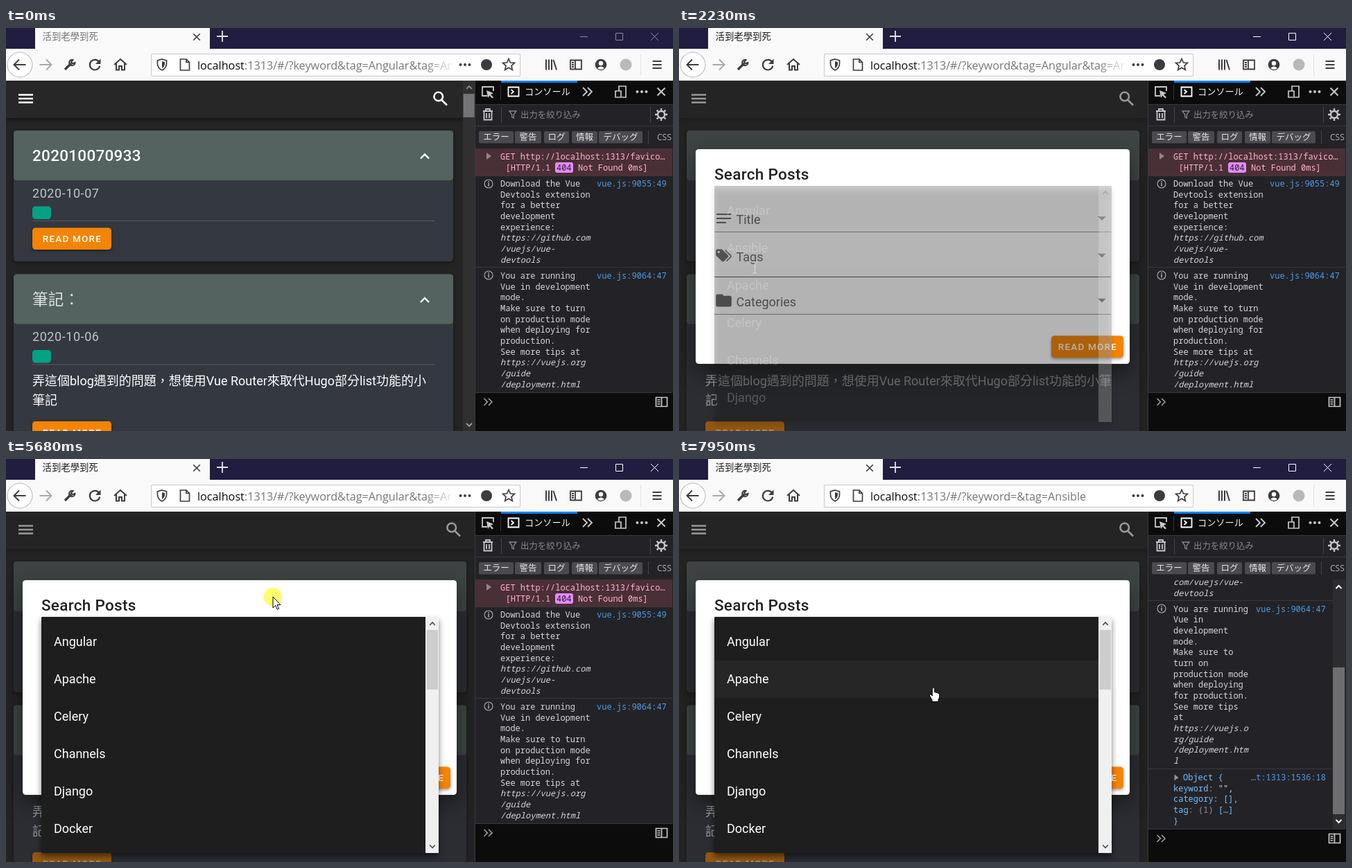
An HTML page with a canvas that plays this animation: 962x582 px, repeating every 8 s.

```html
<!DOCTYPE html>
<html lang="zh-Hant">
<head>
<meta charset="utf-8">
<title>Post search</title>
<style>
html, body { margin: 0; width: 100%; height: 100%; overflow: hidden; background: #242424; }
canvas { display: block; }
</style>
</head>
<body>
<canvas id="stage" width="962" height="582"></canvas>
<script>
const c = document.getElementById('stage').getContext('2d');
const LOOP = 8000;
const CJK = '"Noto Sans CJK TC", "Noto Sans CJK JP", sans-serif';
const roboto = (size, weight = 400) => `${weight} ${size}px Roboto, ${CJK}`;
const japanese = (size, weight = 400) => `${weight} ${size}px "Noto Sans CJK JP", sans-serif`;
const MONO = '12px "Noto Sans Mono", monospace';
const ORANGE = '#f48403', TEAL = '#00a383', GREY = '#666';

// Bursts of screen updates: start, end, number of steps.
const BURSTS = [
  [230, 300, 2], [550, 1350, 11], [1440, 1900, 7], [2050, 2450, 6], [2610, 2840, 4],
  [2990, 3070, 2], [3550, 4340, 11], [4400, 5180, 11], [5430, 5680, 4], [5820, 6210, 6],
  [6360, 7160, 11], [7240, 7320, 2], [7570, 7720, 3], [7870, 7950, 2]
];

// Pointer path: time, x, y, shape from this time on.
const POINTER = [
  [230, 819, 501, 'arrow'], [300, 509, 236, 'arrow'], [550, 509, 236, 'arrow'],
  [860, 626, 102, 'hand'], [1300, 626, 102, 'arrow'], [1515, 109, 346, 'beam'],
  [2600, 109, 346, 'beam'], [2610, 111, 336, 'hand'], [2840, 115, 336, 'hand'],
  [3070, 116, 335, 'hand'], [3550, 116, 335, 'hand'], [3790, 79, 364, 'hand'],
  [4100, 115, 263, 'hand'], [4340, 117, 300, 'hand'], [4400, 117, 303, 'hand'],
  [4750, 117, 303, 'hand'], [5180, 394, 242, 'hand'], [5430, 394, 240, 'hand'],
  [5500, 390, 222, 'arrow'], [5590, 385, 199, 'arrow'], [5900, 385, 199, 'arrow'],
  [6210, 396, 212, 'arrow'], [6360, 400, 218, 'arrow'], [6670, 610, 465, 'hand'],
  [7160, 610, 465, 'hand'], [7240, 480, 392, 'arrow'], [7320, 365, 330, 'beam'],
  [7860, 365, 330, 'beam'], [7870, 367, 330, 'hand']
];
const CLICKS = [[940, 1090], [2050, 2120], [4550, 4700], [5590, 5820], [6750, 6830], [7570, 7715]];

const SHAPES = {
  arrow: 'M0 0V16L3.7 12.5L6.2 18.2L8.6 17.2L6 11.6H11Z',
  hand: 'M-1.7 1.5Q0-.8 1.7 1.5V7Q3 6 4 7.6Q5.6 6.8 6.4 8.4Q8.5 7.7 8.7 10V14L7 18V20.5H-2V18L-5.5 12Q-6 9.5-4 10L-1.7 12Z',
  beam: 'M-3-8H3M0-8V8M-3 8H3'
};
const TAGS_ICON = 'M5.5,9A1.5,1.5 0 0,0 7,7.5A1.5,1.5 0 0,0 5.5,6A1.5,1.5 0 0,0 4,7.5A1.5,1.5 0 0,0 5.5,9M17.41,11.58C18.2,12.4 18.2,13.6 17.41,14.41L12.41,19.41C11.6,20.2 10.4,20.2 9.58,19.41L2.59,12.42C2.22,12.05 2,11.55 2,11V6C2,4.89 2.89,4 4,4H9C9.55,4 10.05,4.22 10.41,4.58L17.41,11.58M13.54,5.71L14.54,4.71L21.41,11.58C22.2,12.4 22.2,13.6 21.42,14.41L16.04,19.79L15.04,18.79L20.75,13Z';
const FOLDER_ICON = 'M10,4H4C2.89,4 2,4.89 2,6V18A2,2 0 0,0 4,20H20A2,2 0 0,0 22,18V8C22,6.89 21.1,6 20,6H12Z';

const clamp = v => Math.max(0, Math.min(1, v));
const ramp = (t, from, to) => clamp((t - from) / (to - from));
const within = (t, from, to) => t >= from && t < to;

function rect(x, y, w, h, color, r = 0) {
  c.fillStyle = color;
  c.beginPath();
  c.roundRect(x, y, w, h, r);
  c.fill();
}
function disc(x, y, r, color) {
  c.fillStyle = color;
  c.beginPath();
  c.arc(x, y, r, 0, 7);
  c.fill();
}
function text(s, x, y, font, color, spacing = 0) {
  c.font = font;
  c.fillStyle = color;
  c.letterSpacing = spacing + 'px';
  c.fillText(s, x, y);
  return x + c.measureText(s).width;
}
function stroke(d, x, y, color, width = 1.6) {
  c.save();
  c.translate(x, y);
  c.strokeStyle = color;
  c.lineWidth = width;
  c.stroke(new Path2D(d));
  c.restore();
}
function shape(d, x, y, color, scale = 1) {
  c.save();
  c.translate(x, y);
  c.scale(scale, scale);
  c.fillStyle = color;
  c.fill(new Path2D(d), 'evenodd');
  c.restore();
}
function shadowed(blur, dy, alpha, draw) {
  c.save();
  c.shadowBlur = blur;
  c.shadowOffsetY = dy;
  c.shadowColor = `rgba(0,0,0,${alpha})`;
  draw();
  c.restore();
}
function clipped(x, y, w, h, draw) {
  c.save();
  c.beginPath();
  c.rect(x, y, w, h);
  c.clip();
  draw();
  c.restore();
}
const cross = (x, y, r, color, w) => stroke(`M${-r} ${-r}L${r} ${r}M${r} ${-r}L${-r} ${r}`, x, y, color, w);
const dots = (x, y, color) => [-6.5, 0, 6.5].forEach(d => disc(x + d, y, 2, color));

function snap(t) {
  let s = 0;
  for (const [from, to, n] of BURSTS) {
    if (t < from) break;
    const step = (to - from) / (n - 1);
    s = t >= to ? to : from + Math.floor((t - from) / step + 1e-6) * step;
  }
  return s;
}

function drawUrl(t) {
  const font = '16.2px "Open Sans", sans-serif', y = 59.5;
  clipped(270, 38, 373, 31, () => {
    const x = text('localhost', 276, y, font, '#0c0c0d');
    if (t >= 6900) {
      text(':1313/#/?keyword=&tag=Ansible', x, y, font, '#76767a');
    } else {
      const fade = c.createLinearGradient(605, 0, 643, 0);
      fade.addColorStop(0, '#76767a');
      fade.addColorStop(1, 'rgba(118,118,122,0.1)');
      text(':1313/#/?keyword&tag=Angular&tag=An', x, y, font, fade);
    }
  });
}

function drawBrowser(t) {
  const ink = '#3c3c40', y = 53, active = t >= 1020;
  rect(0, 0, 962, 31, '#201d40');
  rect(42, 0, 252, 31, '#f9f9fa');
  rect(0, 30, 962, 46, '#f9f9fa');
  text('活到老學到死', 52.5, 17, `13.4px ${CJK}`, active ? '#1c1c1e' : '#737376');
  cross(275, 13, 4.8, ink, 1.6);
  stroke('M-8 0H8M0-8V8', 312, 12, '#e4e4ea', 1.8);
  stroke('M828 12.5H839M879.5 7.5H889.5V17.5H879.5ZM930 7L941 18M941 7L930 18', 0, 0, active ? '#fff' : '#8f8da0', 1);

  disc(20, y, 18.5, '#b5b5b8');
  disc(20, y, 17.5, '#fff');
  stroke('M8.5 0H-8M-1-7.5L-8.5 0L-1 7.5', 20, y, ink, 2);
  stroke('M-8.5 0H8M1-7.5L8.5 0L1 7.5', 57, y, '#a9a9ac', 2);
  stroke('M-7 7L2-2', 92, y, ink, 3.4);
  stroke('M4.5-7A4.2 4.2 0 1 0 7.5-3L3.5-1.5L2-4Z', 92, y, ink, 2);
  stroke('M6.2-4A7.3 7.3 0 1 0 7.3 1.8', 128, y, ink, 2.2);
  shape('M8.5-8.5V-1H1Z', 128, y, ink);
  stroke('M-9 0L0-8L9 0M-6-2V7.5H-2V2H2V7.5H6V-2', 165, y, ink, 2);

  rect(209, 37, 533, 33, '#c9c9cd', 2);
  rect(210, 38, 531, 31, '#fff', 1.5);
  stroke('M0-8L6.5-6V-1Q6 5 0 8Q-6 5-6.5-1V-6Z', 225, y, ink, 1.7);
  shape('M0-5L4-3.8V-1Q3.5 3 0 5Z', 225, y, ink);
  stroke('M-6.5-8H2L6.5-3.5V8H-6.5ZM2-8V-3.5H6.5', 258, y, ink, 1.7);
  drawUrl(t);
  dots(662, y, ink);
  disc(693, y, 8, ink);
  stroke('M0-8.5L2.5-3L8.4-2.5L4 1.5L5.3 7.5L0 4.3L-5.3 7.5L-4 1.5L-8.4-2.5L-2.5-3Z', 725, y, ink, 1.7);
  stroke('M-7-7.5V7.5M-3-7.5V7.5M1-7.5V7.5M3.5-7L8 7.5', 786, y, ink, 2);
  stroke('M-8-6.5H8V6.5H-8ZM-1-6.5V6.5M-6-3H-3M-6 0H-3M-6 3H-3', 822, y, ink, 1.8);
  disc(858, y, 8.3, ink);
  disc(858, y - 2, 3.2, '#f9f9fa');
  shape('M-5 5Q0 0 5 5Q0 9-5 5Z', 858, y, '#f9f9fa');
  disc(894, y, 8.5, '#b9b9bc');
  rect(915, 38, 1, 30, '#e2e2e5');
  stroke('M-6.5-5H6.5M-6.5 0H6.5M-6.5 5H6.5', 939, y, ink, 2);
}

function message(lines, y) {
  lines.forEach((s, i) => {
    const slanted = s[0] === '_';
    text(slanted ? s.slice(1) : s, 713, y + i * 15.68, (slanted ? 'italic ' : '') + MONO, '#d7d7db');
  });
}
function info(y) {
  stroke('M6 0A6 6 0 1 1-6 0A6 6 0 1 1 6 0', 696, y, '#b1b1b3', 1.1);
  rect(695.3, y - 1.5, 1.5, 5, '#b1b1b3');
  rect(695.3, y - 4, 1.5, 1.5, '#b1b1b3');
}
const rule = y => rect(677, y, 284, 1, '#38383d');

function consoleBefore() {
  const pink = '#ffb3d2', link = '#4c9be8';
  rect(677, 174, 284, 39, '#4b2f36');
  shape('M-3-5L4 0L-3 5Z', 696, 185, '#96858a');
  text('GET http://localhost:1313/favico…', 713, 189.5, MONO, pink);
  text('[HTTP/1.1', 720.5, 206, MONO, pink);
  rect(792, 194, 26, 15, '#e38bff', 3);
  text('404', 794, 206, MONO, '#2a2030');
  text('Not Found 0ms]', 825, 206, MONO, pink);
  rule(213);
  info(225);
  message(['Download the Vue', 'Devtools extension', 'for a better', 'development', 'experience:',
    '_https://github.com', '_/vuejs/vue-', '_devtools'], 229);
  text('vue.js:9055:49', 852, 229, MONO, link);
  rule(345);
  info(357);
  message(['You are running', 'Vue in development', 'mode.', 'Make sure to turn', 'on production mode',
    'when deploying for', 'production.', 'See more tips at', '_https://vuejs.org', '_/guide', '_/deployment.html'], 362);
  text('vue.js:9064:47', 852, 362, MONO, link);
}

function consoleAfter() {
  const link = '#4c9be8', key = '#75bfff', plain = '#b1b1b3';
  message(['_com/vuejs/vue-', '_devtools'], 182);
  rule(204);
  info(216);
  message(['You are running', 'Vue in', 'development', 'mode.', 'Make sure to', 'turn on', 'production mode',
    'when deploying', 'for production.', 'See more tips', 'at', '_https://vuejs.o', '_rg/guide', '_/deployment.htm', '_l'], 220.5);
  text('vue.js:9064:47', 832, 220.5, MONO, link);
  rule(447);
  shape('M-2.5-4.5L3.5 0L-2.5 4.5Z', 717, 460, '#939395');
  text('Object {', 727, 464, MONO, key);
  text('…t:1313:1536:18', 825, 464, MONO, link);
  let x = text('keyword', 713, 479.7, MONO, key);
  x = text(': ', x, 479.7, MONO, plain);
  text('"",', x, 479.7, MONO, '#d7d7db');
  x = text('category', 713, 495.4, MONO, key);
  x = text(': ', x, 495.4, MONO, plain);
  text('[],', x, 495.4, MONO, key);
  x = text('tag', 713, 511, MONO, key);
  x = text(': (1) ', x, 511, MONO, '#939395');
  text('[…]', x, 511, MONO, key);
  text('}', 713, 526.7, MONO, key);
  rect(943, 174, 18, 360, '#2d2d30');
  rect(943, 301, 17, 212, '#6e6e70');
  stroke('M-4 2L0-2L4 2', 951.5, 185, '#fff', 2);
  stroke('M-4-2L0 2L4-2', 951.5, 523, '#fff', 2);
}

function drawDevtools(t) {
  const ink = '#c8c8cc', sent = t >= 6900, foot = sent ? 534 : 526;
  rect(676, 76, 286, 506, '#0c0c0d');
  rect(676, 76, 1, 506, '#38383d');
  rect(677, 110, 285, foot - 110, '#232327');
  rect(677, 110, 285, 1, '#38383d');
  rect(677, 141, 285, 1, '#38383d');
  rect(714, 76, 110, 3, '#0a84ff');
  rect(713, 82, 1, 22, '#38383d');
  rect(714, 114, 1, 23, '#45454a');
  rect(929, 114, 1, 23, '#45454a');

  stroke('M-1 6H-8V-7H8V-1', 695, 92, ink, 1.8);
  shape('M-2-2L8 2L4 4L8 8L6 9.5L2.5 5.5L0 9Z', 695, 92, ink);
  stroke('M-7.5-6.5H7.5V6.5H-7.5ZM-3.5-3L0 0L-3.5 3', 732, 92, '#fff', 1.8);
  text('コンソール', 748, 96.5, japanese(13.2), '#f0f0f2');
  stroke('M-6-6L0 0L-6 6M1-6L7 0L1 6', 838, 92, ink, 1.9);
  stroke('M-3-1V-8H7V8H1M-8-1H0V8H-8Z', 887, 92, ink, 1.7);
  dots(917, 92, ink);
  cross(945, 92, 5.5, ink, 2);
  stroke('M-7-5H7M-3-5V-8H3V-5M-5.5-5V7.5H5.5V-5M-2-2V5M2-2V5', 695, 125, ink, 1.8);
  stroke('M-5-5H5L1.3 0V5L-1.3 3.5V0Z', 731, 125, '#88888c', 1.3);
  text('出力を絞り込み', 742, 130, japanese(12.4, 300), '#88888c');
  stroke('M5 0A5 5 0 1 1-5 0A5 5 0 1 1 5 0', 945, 125, ink, 2.4);
  stroke('M0-9V-6M0 9V6M-9 0H-6M9 0H6M-6.4-6.4L-4-4M6.4 6.4L4 4M-6.4 6.4L-4 4M6.4-6.4L4-4', 945, 125, ink, 2.4);

  [['エラー', 682, 50], ['警告', 734, 38], ['ログ', 776, 36], ['情報', 816, 37], ['デバッグ', 855, 63]]
    .forEach(([label, x, w]) => {
      rect(x, 149, w, 17.5, '#4a4a4f', 2);
      c.textAlign = 'center';
      text(label, x + w / 2, 162.3, japanese(12.5), '#e6e6ea');
      c.textAlign = 'left';
    });
  rect(926, 148, 1, 19, '#45454a');
  text('CSS', 939, 162, '12px "Open Sans", sans-serif', '#b1b1b3');

  clipped(677, 174, 285, foot - 174, sent ? consoleAfter : consoleBefore);
  rule(foot);
  stroke('M-5.5-5L-.5 0L-5.5 5M1-5L6 0L1 5', 695, foot + 14, '#a0a0a4', 1.6);
  stroke('M-8-6.5H8V6.5H-8ZM0-6.5V6.5M-6-3H-2M-6 0H-2M-6 3H-2', 945.5, foot + 14, ink, 1.7);
}

function button(x, y, w, h, color) {
  shadowed(4, 2, 0.4, () => rect(x, y, w, h, color, 4.5));
  text('READ MORE', x + (w - 84.5) / 2, y + h / 2 + 4.8, roboto(13.5, 500), '#fff', 1.2);
}

function card(y, h, title, weight, date, grow) {
  shadowed(5, 2, 0.4, () => rect(11, y, 634 + grow, h, '#343840', 4.5));
  rect(11, y, 634 + grow, 72, '#546260', 4.5);
  text(title, 38, y + 44, roboto(22.5, weight), weight < 400 ? '#dfe2e2' : '#fff', 0.28);
  stroke('M-6 3.5L0-2.5L6 3.5', 604 + grow, y + 37, '#fff', 2.4);
  text(date, 38, y + 96.5, roboto(18), 'rgba(255,255,255,0.7)', 0.56);
  rect(38, y + 109.5, 27, 18.5, TEAL, 4.5);
  rect(38, y + 130, 580 + grow, 1, '#575b62');
}

function drawPage(t) {
  const wide = t >= 1330, grow = wide ? 19 : 0;
  rect(0, 76, 676, 506, '#242424');
  card(148, 189, '202010070933', 500, '2020-10-07', grow);
  button(38, 288.5, 114, 31.5, ORANGE);
  card(355.5, 280, '筆記：', 300, '2020-10-06', grow);
  const body = '弄這個blog遇到的問題，想使用Vue Router來取代Hugo部分list功能的小';
  text(body + (wide ? '筆' : ''), 38, 516, roboto(18), '#fff');
  text(wide ? '記' : '筆記', 38, 544, roboto(18), '#fff');
  button(38, 568, 114, 31.5, ORANGE);

  shadowed(6, 2, 0.5, () => rect(0, 76, 676, 54, '#272727'));
  stroke('M18 96.5H39M18 102H39M18 107.5H39', 0, 0, '#fff', 2.3);
  const glow = 0.09 * ramp(t, 860, 1020) * (1 - ramp(t, 1530, 1830));
  if (glow) disc(626 + grow, 102, 27, `rgba(255,255,255,${glow})`);
  stroke('M4-3A6.3 6.3 0 1 1-8.6-3A6.3 6.3 0 1 1 4-3M2 1.5L10 9.5', 626 + grow, 102, '#fff', 2.6);

  if (!wide) {
    rect(659, 76, 17, 506, '#303031');
    rect(659.5, 95, 16, 34, '#747476');
    stroke('M-4 2L0-2L4 2', 668, 86, '#8a8a8c', 1.8);
    stroke('M-4-2L0 2L4-2', 668, 573, '#a0a0a2', 1.8);
  }
  rect(0, 76, 676, 506, `rgba(33,33,33,${0.46 * ramp(t, 1300, 1500)})`);
}

function drawDialog(t) {
  const p = ramp(t, 1362, 1662);
  if (!p) return;
  const eased = 1 - (1 - p) ** 4, scale = 0.5 + eased / 2;
  const chosen = t >= 4710, line = '#949494';
  c.save();
  c.globalAlpha = eased;
  c.translate(337, 330);
  c.scale(scale, scale);
  c.translate(-337, -330);
  shadowed(30, 12, 0.45, () => rect(24, 175, 626, 310, '#fff', 4.5));
  text('Search Posts', 51, 219, roboto(22.5, 500), '#212121', 0.28);

  stroke('M54 269H75M54 275H75M54 281H68', 0, 0, GREY, 2.2);
  text('Title', 82.5, 282.6, roboto(18), GREY);
  shape(TAGS_ICON, 51, 315, GREY, 1.125);
  shape(FOLDER_ICON, 51, 380, GREY, 1.125);
  text('Categories', 82.5, 401.5, roboto(18), GREY);
  [275, 328.5, 393.5].forEach(y => shape('M-5.8-2.8H5.8L0 3Z', 610, y, GREY));
  const tagsHover = within(t, 1500, 5400) || t >= 7240;
  rect(51, 294, 572, 1, line);
  rect(51, 359, 572, 1, tagsHover ? '#5e5e5e' : line);
  rect(51, 413, 572, 1, line);

  if (chosen) {
    text('Tags', 82.5, 313, roboto(13.5), GREY);
    rect(87, 317, 102, 36, TEAL, 18);
    text('Ansible', 100.5, 341, roboto(15.75), '#fff', 0.1);
    disc(170, 334, 9, '#fff');
    cross(170, 334, 3.6, TEAL, 2);
    cross(578.5, 328.5, 7, GREY, 2);
  } else {
    text('Tags', 82.5, 337, roboto(18), GREY);
  }

  button(537, 444.5, 104, 31.5, ORANGE);
  if (within(t, 6660, 7235)) rect(537, 444.5, 104, 31.5, 'rgba(255,255,255,0.12)', 4.5);
  c.restore();
}

function drawMenu(t) {
  const alpha = t < 5820 ? ramp(t, 2140, 2440) : t < 6220 ? 1 - ramp(t, 5800, 6100) : ramp(t, 7800, 7940);
  if (!alpha) return;
  const chosen = t >= 4710;
  const hover = t > 7000 ? 0.035 : within(t, 2140, 4950) ? 0.08 : 0;
  c.save();
  c.globalAlpha = alpha;
  shadowed(9, 5, 0.5, () => rect(51, 228, 573, 341, '#1e1e1e', 1));
  if (hover) rect(51, 291, 554, 54, `rgba(255,255,255,${hover})`);
  ['Angular', 'Ansible', 'Apache', 'Celery', 'Channels', 'Django', 'Docker']
    .filter(s => !chosen || s !== 'Ansible').slice(0, 6)
    .forEach((s, i) => text(s, 69, 270.3 + i * 54, roboto(18), '#fff'));
  rect(605, 228, 19, 341, '#f0f0f0');
  rect(606.5, 247, 16.5, chosen ? 86 : 81.5, '#cdcdcd');
  stroke('M-3.8 2L0-2L3.8 2', 615, 238, '#505050', 1.8);
  stroke('M-3.8-2L0 2L3.8-2', 615, 559.5, '#505050', 1.8);
  c.restore();
}

function drawPointer(t) {
  const i = POINTER.findLastIndex(k => t >= k[0]);
  if (i < 0) return;
  const [t0, x0, y0, kind] = POINTER[i];
  const [t1, x1, y1] = POINTER[i + 1] || [LOOP, x0, y0];
  const p = ramp(t, t0, t1);
  const x = Math.round(x0 + (x1 - x0) * p), y = Math.round(y0 + (y1 - y0) * p);
  if (CLICKS.some(([from, to]) => within(t, from, to))) disc(x, y, 13.3, 'rgba(255,250,0,0.57)');
  if (kind === 'beam') {
    stroke(SHAPES.beam, x + 0.5, y, t > 2140 && t < 2600 ? '#ddd' : '#222', 1);
    return;
  }
  shape(SHAPES[kind], x, y, '#fff');
  stroke(SHAPES[kind], x, y, '#000', 1);
}

function frame() {
  const t = snap(performance.now() % LOOP);
  drawPage(t);
  drawDialog(t);
  drawMenu(t);
  drawBrowser(t);
  drawDevtools(t);
  drawPointer(t);
  requestAnimationFrame(frame);
}
frame();
</script>
</body>
</html>
```
